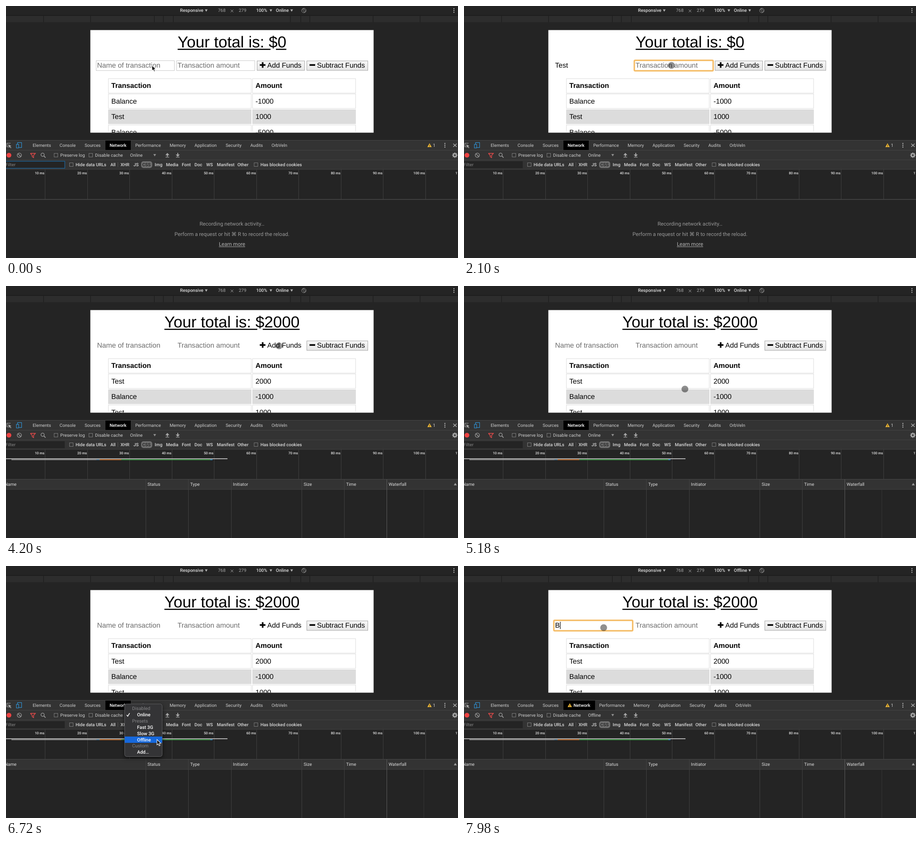
Recreate the animation shown at these times as an HTML page with a canvas. Size 1000x560 px, loop 8000 ms.

```html
<!DOCTYPE html>
<html lang="en">
<head>
<meta charset="utf-8">
<title>Budget page with developer tools</title>
<style>
html, body { margin: 0; width: 100%; height: 100%; overflow: hidden; background: #242424; }
canvas { display: block; }
</style>
</head>
<body>
<canvas id="stage" width="1000" height="560"></canvas>
<script>
const ctx = document.getElementById('stage').getContext('2d');
ctx.textRendering = 'geometricPrecision';
const LOOP = 8000, STEP = 140;
const PAGE_FONT = '"Liberation Sans", Arial, sans-serif';
const UI_FONT = 'Roboto, sans-serif';

// Pointer stops: time, x, y
const PATH = [
  [0, 323, 132], [140, 323, 133], [420, 298, 132], [1400, 298, 132],
  [1680, 380, 114], [1960, 459, 132], [3220, 459, 132], [3360, 527, 163],
  [3640, 604, 133], [4760, 604, 133], [5040, 540, 190], [5600, 335, 346],
  [5740, 326, 333], [6020, 326, 333], [6300, 330, 360], [6580, 334, 385],
  [6860, 334, 386], [7140, 318, 160], [7280, 313, 143], [7560, 309, 137], [LOOP, 309, 137]
];

function pointerAt(t) {
  const i = PATH.findIndex(p => p[0] > t);
  const [t0, x0, y0] = PATH[i - 1], [t1, x1, y1] = PATH[i];
  const k = (t - t0) / (t1 - t0);
  return [x0 + (x1 - x0) * k, y0 + (y1 - y0) * k];
}

function rect(x, y, w, h, color) {
  ctx.fillStyle = color;
  ctx.fillRect(x, y, w, h);
}

function frame(x, y, w, h, color, width = 1) {
  ctx.strokeStyle = color;
  ctx.lineWidth = width;
  ctx.strokeRect(x, y, w, h);
}

function rounded(x, y, w, h, r) {
  ctx.beginPath();
  ctx.roundRect(x, y, w, h, r);
}

function disc(x, y, r, color) {
  ctx.beginPath();
  ctx.arc(x, y, r, 0, 7);
  ctx.fillStyle = color;
  ctx.fill();
}

function ring(x, y, r, color, width = 1.3) {
  ctx.beginPath();
  ctx.arc(x, y, r, 0, 7);
  ctx.strokeStyle = color;
  ctx.lineWidth = width;
  ctx.stroke();
}

function poly(points, fill, stroke, width = 1) {
  ctx.beginPath();
  points.forEach(([x, y]) => ctx.lineTo(x, y));
  if (fill) { ctx.closePath(); ctx.fillStyle = fill; ctx.fill(); }
  if (stroke) { ctx.strokeStyle = stroke; ctx.lineWidth = width; ctx.stroke(); }
}

// y is the middle of the capital letters
function write(str, x, y, font, size, color, weight = 400, align = 'left') {
  ctx.font = `${weight} ${size}px ${font}`;
  ctx.textAlign = align;
  ctx.fillStyle = color;
  ctx.fillText(str, x, y + size * 0.345);
  return ctx.measureText(str).width;
}

const ui = (str, x, y, color = '#cdcdcd', weight = 400, size = 9.9, align) =>
  write(str, x, y, UI_FONT, size, color, weight, align);
const page = (str, x, y, color = '#000', weight = 400) =>
  write(str, x, y, PAGE_FONT, 15.65, color, weight);

const dropMark = (x, y, color = '#b0b0b0') =>
  poly([[x - 3, y - 2.5], [x + 3, y - 2.5], [x, y + 2.8]], color);
const checkbox = (x, y) => frame(x + .5, y - 3.5, 8, 8, '#7b7b7b');
const kebab = (x, y) => [-4, 0, 4].forEach(d => disc(x, y + d, 1.2, '#b5b5b5'));

function warning(x, y) {
  poly([[x, y - 4.5], [x + 4.8, y + 4], [x - 4.8, y + 4]], '#f4bd3a');
  rect(x - .5, y - 1.5, 1.2, 3, '#4a3500');
  rect(x - .5, y + 2.2, 1.2, 1.1, '#4a3500');
}

function drawDeviceBar(offline) {
  ui('Responsive', 385, 10, '#dcdcdc', 500, 10);
  dropMark(443, 10);
  ui('768', 469, 10, '#a8a8a8', 400, 10);
  poly([[497, 8], [503, 14]], null, '#999');
  poly([[503, 8], [497, 14]], null, '#999');
  ui('279', 515, 10, '#a8a8a8', 400, 10);
  ui('100%', 553.5, 10, '#dcdcdc', 500, 10);
  dropMark(586, 10);
  ui(offline ? 'Offline' : 'Online', 597, 10, '#dcdcdc', 500, 10);
  dropMark(632, 10);
  ring(659, 10, 5, '#8c8c8c', 1);
  poly([[656, 7], [659, 6], [663, 12], [660, 14], [656, 7]], null, '#8c8c8c');
  kebab(991, 10);
  rect(0, 20, 1000, 2, '#1e1e1e');
  rect(0, 22, 1000, 14, '#2d2d2d');
  for (const x of [83, 187, 328, 348, 370, 629, 652, 672, 812, 916]) rect(x - .5, 22, 1.5, 14, '#1f1f1f');
}

function drawTitle(amount) {
  const prefix = 'Your total is: ', title = prefix + amount;
  ctx.font = `35.1px ${PAGE_FONT}`;
  const width = ctx.measureText(title).width, x = 500 - width / 2;
  const sign = x + ctx.measureText(prefix).width;
  write(title, x, 80, PAGE_FONT, 35.1, '#000');
  rect(x, 95, sign + 4 - x, 2.5, '#000');
  rect(sign + 16, 95, x + width - sign - 16, 2.5, '#000');
}

function drawField(x, hint, value, border, focused, caret) {
  if (border && !focused) frame(x + .5, 121.5, 173, 22, '#c9c9c9');
  if (focused) {
    rounded(x - .2, 120.7, 174.4, 23.3, 2);
    ctx.strokeStyle = 'rgba(246,190,100,.45)';
    ctx.lineWidth = 4;
    ctx.stroke();
    ctx.strokeStyle = '#f4b961';
    ctx.lineWidth = 2.4;
    ctx.stroke();
  }
  const width = page(value || hint, x + 2.5, 132, value ? '#000' : '#6c6c6c');
  if (caret) rect(x + 3 + (value ? width : 0), 124, 1.2, 16, '#000');
}

function drawButton(x, w, label, plus, border) {
  if (border) {
    const shade = ctx.createLinearGradient(0, 122, 0, 143);
    shade.addColorStop(0, '#f6f6f6');
    shade.addColorStop(1, '#e6e6e6');
    rect(x, 121.5, w, 22, shade);
    frame(x + .5, 122, w - 1, 21, '#a6a6a6');
  }
  rect(x + 6.5, 129.3, 12.5, 3.6, '#000');
  if (plus) rect(x + 11, 124.9, 3.6, 12.4, '#000');
  page(label, x + 23, 132);
}

function drawTable(rows) {
  [['Transaction', 'Amount'], ...rows].forEach(([name, amount], i) => {
    const y = 161 + i * 34.4, weight = i ? 400 : 700;
    for (const [x, w, label] of [[226, 317, name], [545, 229, amount]]) {
      if (i === 2) rect(x, y, w, 32.5, '#dcdcdc');
      else frame(x + .5, Math.round(y) + .5, w - 1, 32, '#dcdcdc');
      page(label, x + 7, y + 16, '#000', weight);
    }
  });
}

function drawPage(t, sent) {
  const typed = (word, start) => word.slice(0, Math.max(0, Math.floor((t - start) / STEP) + 1));
  const focus = t >= 7560 || (t >= 420 && t < 2100) ? 'name'
    : t >= 2100 && t < 3640 ? 'amount' : '';
  const blink = Math.floor(t / 500) % 2 === 1;
  const name = sent ? typed('B', 7980) : typed('Test', 840);
  const amount = sent ? '' : typed('2000', 2520);

  ctx.save();
  ctx.beginPath();
  ctx.rect(186.6, 53.6, 626.7, 227.9);
  ctx.clip();
  rect(186, 53, 628, 229, '#fff');
  drawTitle(sent ? '$2000' : '$0');
  drawField(199, 'Name of transaction', name, t < 2100, focus === 'name', focus === 'name' && blink);
  drawField(377, 'Transaction amount', amount, t < 3640, focus === 'amount', focus === 'amount' && blink);
  drawButton(555, 106, 'Add Funds', true, t < 3640);
  drawButton(665, 136, 'Subtract Funds', false, true);
  const rows = [['Balance', '-1000'], ['Test', '1000'], ['Balance', '-5000']];
  drawTable(sent ? [['Test', '2000'], ...rows] : rows);
  ctx.restore();
}

function drawTabs(offline) {
  rect(0, 298, 1000, 22, '#333');
  rect(0, 298, 1000, 1, '#484848');
  // inspect and device icons
  poly([[10, 305], [2, 305], [2, 313], [5, 313]], null, '#a8a8a8', 1.2);
  poly([[5, 307.5], [12, 311], [9, 312], [12, 315], [10.5, 316], [8, 313], [6.5, 315.5]], '#a8a8a8');
  frame(25.5, 303.5, 9, 11, '#2f8fd0', 1.2);
  rect(22.5, 307, 5.5, 9, '#333');
  frame(23, 307.5, 5, 8, '#2f8fd0', 1.2);

  const shift = offline ? 13 : 0;
  rect(220, 299, offline ? 70 : 56, 21, '#000');
  if (offline) warning(234, 309.5);
  ui('Network', 229.3 + shift, 309.5, '#fff', 500);
  const tabs = { Elements: 59, Console: 118.5, Sources: 174, Performance: 286, Memory: 362,
    Application: 417, Security: 486, Audits: 540.5, OrbVeln: 587.5 };
  for (const [label, x] of Object.entries(tabs)) ui(label, x + (x > 229 ? shift : 0), 309.5, '#cdcdcd', 400, 9.8);
  warning(937, 309.5);
  ui('1', 944.5, 309.5);
  kebab(971, 309.5);
  poly([[989.5, 306], [997, 313]], null, '#b0b0b0', 1.4);
  poly([[997, 306], [989.5, 313]], null, '#b0b0b0', 1.4);
}

function drawToolbar(offline) {
  rect(0, 320, 1000, 22, '#333');
  rect(0, 320, 1000, 1, '#444');
  disc(6.5, 331.5, 5.3, '#ee4444');
  ring(29.5, 331.5, 4.6, '#a0a0a0');
  poly([[26.3, 328.3], [32.7, 334.7]], null, '#a0a0a0', 1.3);
  poly([[54, 327.5], [65, 327.5], [61, 332], [61, 337], [58, 335], [58, 332], [54, 327.5]], null, '#ec4b4b', 1.4);
  ring(81, 330.5, 3.6, '#a0a0a0');
  poly([[83.7, 333.2], [87.5, 337]], null, '#a0a0a0', 1.7);
  checkbox(106, 331);
  ui('Preserve log', 120, 331.5);
  checkbox(183, 331);
  ui('Disable cache', 197, 331.5);
  ui(offline ? 'Offline' : 'Online', 274.5, 331.5);
  dropMark(329, 331.5, '#8f8f8f');
  poly([[357, 326.5], [361.5, 331.5], [352.5, 331.5]], '#a8a8a8');
  rect(356, 331, 2, 3.5, '#a8a8a8');
  rect(353, 335.3, 8, 1.2, '#a8a8a8');
  poly([[375.5, 330], [384.5, 330], [380, 335]], '#a8a8a8');
  rect(379, 326.5, 2, 4, '#a8a8a8');
  rect(376, 335.3, 8, 1.2, '#a8a8a8');
  for (let i = 0; i < 8; i++) {
    const a = i * Math.PI / 4;
    poly([[993, 331.5], [993 + 6 * Math.cos(a), 331.5 + 6 * Math.sin(a)]], null, '#a8a8a8', 2);
  }
  ring(993, 331.5, 3.4, '#a8a8a8', 2.4);
  disc(993, 331.5, 1.9, '#333');
}

function drawFilters(filterFocused) {
  rect(0, 342, 1000, 21, '#333');
  rect(0, 341.5, 1000, 1, '#444');
  rect(0, 345, 130, 15.5, '#242424');
  if (filterFocused) frame(-2, 345, 132, 15.5, '#1c6aa5', 1.2);
  ui('Filter', -1, 353, '#858585');
  rounded(299, 345, 24.5, 15, 5);
  ctx.fillStyle = '#6e6e6e';
  ctx.fill();
  rect(247, 347, 1, 11, '#505050');
  const filters = { 'Hide data URLs': 154, All: 231, XHR: 253.5, JS: 282, CSS: 301.5, Img: 329,
    Media: 354, Font: 389, Doc: 417, WS: 443, Manifest: 466.5, Other: 512, 'Has blocked cookies': 563 };
  for (const [label, x] of Object.entries(filters)) {
    ui(label, x, 352.5, label === 'CSS' ? '#1c1c1c' : '#dadada', 500);
  }
  checkbox(140, 352);
  checkbox(548.5, 352);
}

function drawOverview(sent) {
  rect(0, 363, 1000, 197, '#242424');
  rect(0, 362.5, 1000, 1, '#444');
  for (let i = 1; i <= 11; i++) {
    const x = Math.floor(-7 + i * 93.5);
    rect(x, 363, 1, 67, '#3f3f3f');
    ui(`${i * 10} ms`, x - 1, 371, '#e6e6e6', 500, 7.7, 'right');
  }
  if (sent) {
    rect(0, 383, 490, 1.6, '#d0d0d0');
    rect(12, 385.3, 195, 1.6, '#9c9c9c');
    rect(200, 385.3, 8, 1.6, '#4c7fa0');
    rect(207, 385.3, 48, 1.6, '#d9752a');
    rect(255, 385.3, 198, 1.6, '#3aa845');
    rect(452, 385.3, 5, 1.6, '#2f9be0');
  }
  rect(0, 429, 1000, 1.5, '#484848');
}

function drawRequests() {
  rect(0, 430, 1000, 22, '#333');
  rect(0, 451.5, 1000, 1, '#444');
  const columns = { Name: -3, Status: 313, Type: 407.5, Initiator: 502, Size: 658.5, Time: 752.5, Waterfall: 846.5 };
  for (const [label, x] of Object.entries(columns)) {
    if (x > 0) rect(Math.floor(x - 4), 430, 1, 130, x > 800 ? '#5c5c5c' : '#414141');
    ui(label, x, 440.5, '#dcdcdc');
  }
  rect(924, 452, 1, 108, '#343434');
  poly([[994, 437.5], [997.3, 443], [990.7, 443]], '#999');
}

function drawEmptyHint() {
  const hint = (str, y) => ui(str, 500, y, '#999', 400, 11.65, 'center');
  hint('Recording network activity…', 483.5);
  hint('Perform a request or hit ⌘ R to record the reload.', 506.5);
  const width = ui('Learn more', 500, 529.5, '#b4b4b4', 400, 11.5, 'center');
  rect(500 - width / 2, 534.5, width, 1, '#b4b4b4');
}

function drawMenu(pointerY) {
  ctx.save();
  ctx.shadowColor = 'rgba(0,0,0,.6)';
  ctx.shadowBlur = 9;
  ctx.shadowOffsetY = 3;
  rounded(262, 306, 84, 118, 5);
  ctx.fillStyle = '#343436';
  ctx.fill();
  ctx.restore();
  rounded(262.5, 306.5, 83, 117, 5);
  ctx.strokeStyle = '#5d5d5f';
  ctx.lineWidth = 1;
  ctx.stroke();
  const items = ['Disabled', 'Online', 'Presets', 'Fast 3G', 'Slow 3G', 'Offline', 'Custom', 'Add…'];
  const hovered = Math.round((pointerY - 316.5) / 13.9);
  items.forEach((label, i) => {
    const y = 316.5 + i * 13.9, heading = i % 2 === 0 && i !== 4;
    if (i === hovered && !heading) rect(262.5, y - 7, 83, 14, '#1668dc');
    ui(label, heading ? 279 : 290, y, heading ? '#858587' : '#fff', heading ? 400 : 500, 10.4);
  });
  poly([[267, 331], [269.3, 334], [273.5, 327]], null, '#fff', 1.5);
}

function drawPointer(t, x, y) {
  const overPage = x > 187 && x < 813 && y > 54 && y < 281;
  if (overPage && t >= STEP) return disc(x, y, 7.6, 'rgba(0,0,0,.44)');
  const shape = [[0, 0], [0, 12], [2.8, 9.6], [4.8, 14], [6.8, 13.1], [4.9, 8.8], [8.6, 8.6], [0, 0]];
  poly(shape.map(([dx, dy]) => [x + dx, y + dy]), '#000', '#fff', 1.1);
}

function draw(now) {
  const t = Math.floor(now % LOOP / STEP) * STEP;
  const [x, y] = pointerAt(t);
  const sent = t >= 3780, offline = t >= 6860;
  rect(0, 0, 1000, 560, '#242424');
  drawDeviceBar(offline);
  drawPage(t, sent);
  drawTabs(offline);
  drawToolbar(offline);
  drawFilters(t < 420);
  drawOverview(sent);
  if (sent) drawRequests();
  else drawEmptyHint();
  if (t >= 5740 && !offline) drawMenu(y);
  drawPointer(t, x, y);
  requestAnimationFrame(tick);
}

const start = performance.now();
function tick() { draw(performance.now() - start); }
tick();
</script>
</body>
</html>
```
